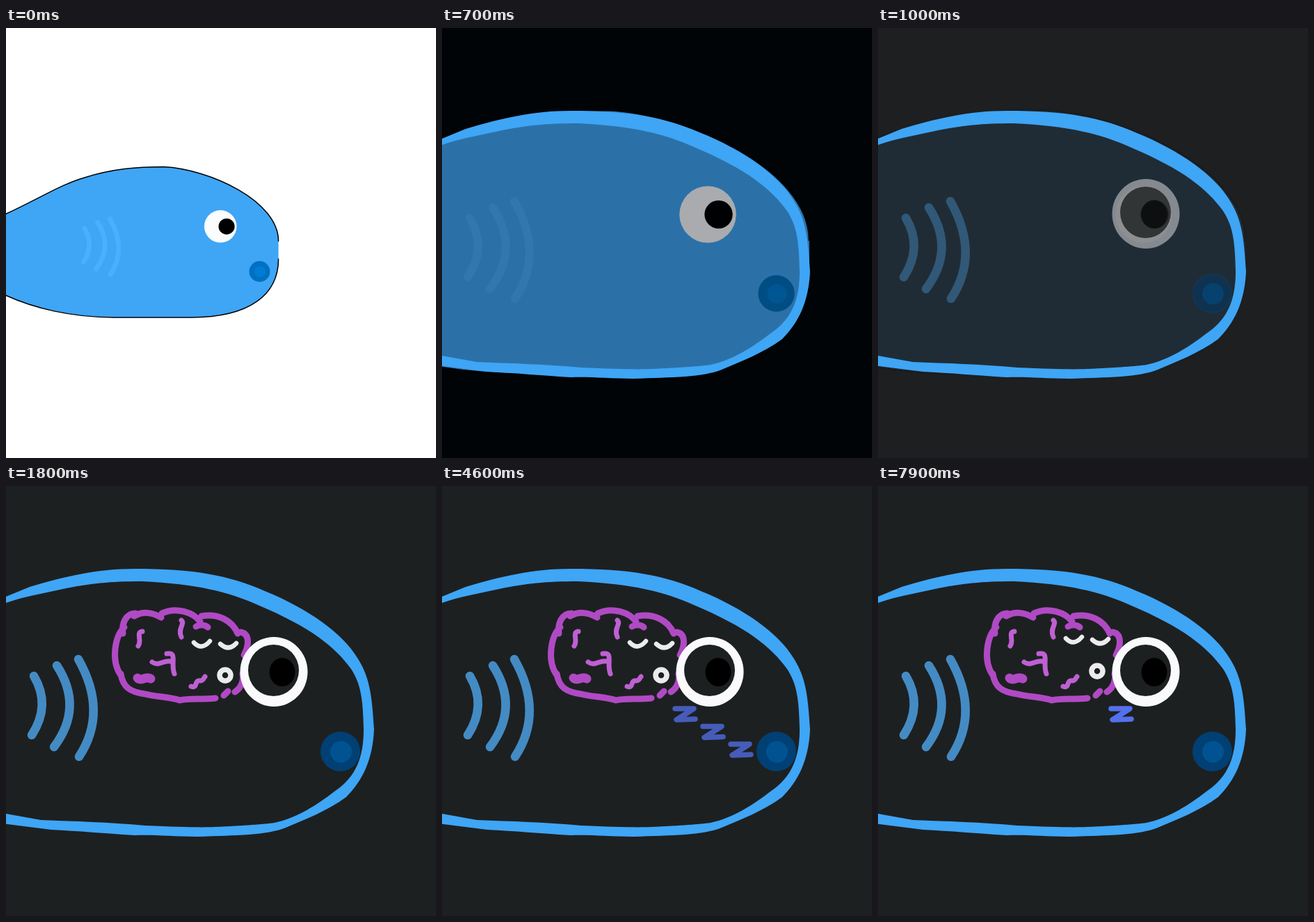
An HTML page with a canvas that plays this animation: 618x618 px, repeating every 8000 ms.

```html
<!DOCTYPE html>
<html>
<head>
<meta charset="utf-8">
<title>Sleeping fish brain</title>
<style>
html, body { margin: 0; width: 100%; height: 100%; overflow: hidden; background: #fff; }
canvas { display: block; }
</style>
</head>
<body>
<canvas id="stage" width="618" height="618"></canvas>
<script>
const ctx = document.getElementById('stage').getContext('2d');
const LOOP = 8000, STEP = 100;
const BLUE = '#3fa5f5', PURPLE = '#b04ac4';

const body = 'M-170 242C-80 202 -25 164 40 145C110 123 170 118 240 118' +
  'C354 124 528 203 528 305V350C528 440 455 497 310 497H114C10 497 -90 475 -170 436';
// The rim leaves out the flat front of the body
const rim = body.replace('V350', 'M528 350');

const outline = 'M-5 161L34 145C85 130 130 119 185 119C270 119 320 128 372 151' +
  'C434 176 484 212 505 247C524 276 526 305 529 350C527 394 512 424 489 447' +
  'C462 467 428 480 402 491C375 502 330 502 275 504C240 504 215 501 185 502' +
  'C140 499 105 496 65 494L-5 485V470L50 480C100 482 145 483 200 488' +
  'C250 490 280 491 300 490C345 488 370 486 386 484C418 477 446 459 472 439' +
  'C504 418 514 388 514 350C513 305 510 285 496 263C473 231 438 203 362 171' +
  'C320 152 275 141 195 137C150 137 120 140 82 148L40 157C25 160 10 164 -5 170Z';

const gills = 'M40 273Q65 315 37 358M73 258Q112 318 69 375M104 249Q147 325 105 389';

const brain = 'M168 212C166 198 172 183 186 183M184 187C196 180 210 181 223 189' +
  'M224 183C245 173 270 182 279 195M281 187C305 183 325 193 333 212' +
  'M337 210C350 212 350 228 342 243M340 270C342 280 338 290 329 296' +
  'M301 305C280 307 262 305 250 308C236 303 215 303 200 299C178 296 168 289 165 270' +
  'M165 272C150 250 157 215 170 203M273 202C278 199 286 199 290 203M313 301L319 295';

const folds = 'M196 209C186 210 196 222 190 230M252 193C258 198 246 205 252 217' +
  'M210 253C220 260 225 250 237 252M231 241C247 238 236 255 242 270' +
  'M266 288C276 292 270 278 279 280C284 280 284 276 286 274';
const blob = 'M189 276C195 282 200 272 208 277';

const lids = 'M270 219Q281 231 293 217M308 221Q320 232 331 220';
const zed = 'M335 320H362L337 336L364 335';

// [time, vertical offset of the sleeping face]
const bob = [[0, 8], [1800, 6], [2200, 4], [2400, 2], [2600, 0], [2800, -2],
  [3400, 0], [3800, 2], [4200, 4], [4600, 6], [5400, 8],
  [6100, 6], [6700, 4], [7000, 0], [7300, -2], [7900, 0]];

const clamp = v => Math.max(0, Math.min(1, v));

function fill(d, color) {
  ctx.fillStyle = color;
  ctx.fill(new Path2D(d));
}

function stroke(d, color, width) {
  ctx.strokeStyle = color;
  ctx.lineWidth = width;
  ctx.stroke(new Path2D(d));
}

function oval(x, y, rx, color, ry = rx) {
  ctx.fillStyle = color;
  ctx.beginPath();
  ctx.ellipse(x, y, rx, ry, 0, 0, 7);
  ctx.fill();
}

function backdrop(color) {
  ctx.fillStyle = color;
  ctx.fillRect(0, 0, 618, 618);
}

function layer(alpha, draw, x = 0, y = 0, scale = 1) {
  if (alpha <= 0) return;
  ctx.save();
  ctx.globalAlpha = alpha;
  ctx.translate(x, y);
  ctx.scale(scale, scale);
  draw();
  ctx.restore();
}

function fish() {
  fill(body, BLUE);
  stroke(rim, '#000', 2.6);
  stroke(gills, '#4aafff', 12);
  oval(382, 268, 40.8, '#fafcfe');
  oval(397.5, 268, 20.2, '#000');
  oval(480.5, 381.5, 26.2, '#0070c0');
  oval(481.5, 382, 14, '#007cd6');
}

function organs() {
  stroke(gills, '#448bc4', 12.5);
  ctx.fillStyle = '#fafafc';
  ctx.beginPath();
  ctx.ellipse(385, 267, 48.5, 50, 0, 0, 7);
  ctx.closePath();
  ctx.moveTo(421, 265);
  ctx.ellipse(384.5, 265, 36.5, 37, 0, 0, 7);
  ctx.fill('evenodd');
  oval(397, 267.5, 18.5, '#000', 20.5);
  oval(480.5, 381.5, 28.5, '#004074');
  oval(481.5, 382, 15.5, '#005390');
}

function face() {
  stroke(lids, '#ececec', 6.5);
  ctx.lineWidth = 7.5;
  ctx.beginPath();
  ctx.arc(315, 266, 8, 0, 7);
  ctx.stroke();
}

function zeds(t) {
  const start = t >= 7900 ? 7900 : 3400;
  const age = Math.floor((t - start) / 400);
  const alpha = 1 - clamp((age - 2) / 4);
  for (let i = 0; i < 3 && i <= age; i++)
    layer(alpha, () => stroke(zed, '#5470ec', 7.5), i * 40, i * 25.5);
}

function draw(t) {
  const dark = t >= 600;
  const glow = clamp((t - 680) / 320);
  const night = `rgb(${29 * glow},${3 + 29 * glow},${6 + 27 * glow})`;
  backdrop(dark ? night : '#fff');

  const p = clamp(t / 600);
  const scale = 0.571 + 0.429 * (p + 0.19 * p * (1 - p));
  if (t < 1100) layer(1, fish, 210 * (1 - scale), 308 * (1 - scale), scale);
  if (!dark) return;

  // The night covers the whole fish evenly, leaving only its outline
  layer(clamp((t - 530) / 520), () => backdrop(night));
  fill(outline, BLUE);
  layer(clamp((t - 1000) / 300), () => stroke(brain, PURPLE, 9));
  const inner = clamp((t - 1400) / 200);
  layer(inner, () => {
    stroke(folds, '#be60d2', 7);
    stroke(blob, PURPLE, 13);
  });
  const [, lift] = bob.findLast(b => b[0] <= t);
  layer(inner, face, 0, lift);
  layer(clamp((t - 750) / 550), organs);
  zeds(t);
}

ctx.lineCap = ctx.lineJoin = 'round';
const begin = performance.now();
function tick() {
  const t = (performance.now() - begin) % LOOP;
  draw(Math.floor(t / STEP) * STEP);
  requestAnimationFrame(tick);
}
tick();
</script>
</body>
</html>
```
